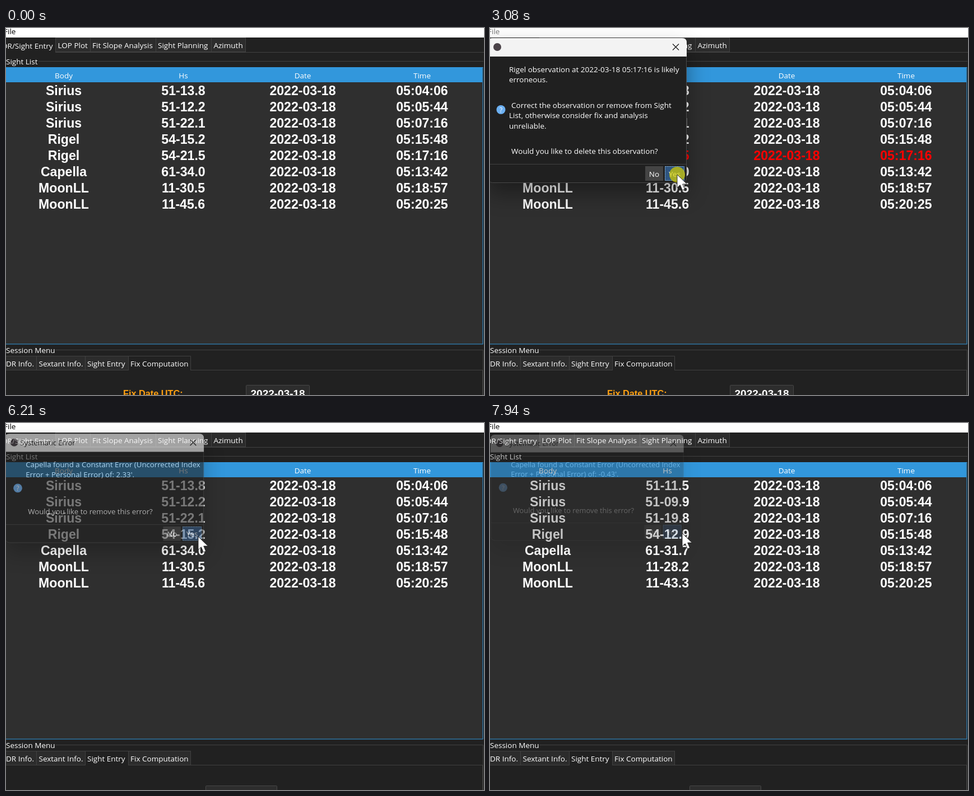
These frames come from a looping animation (853x656 px, 8000 ms). An HTML page:

```html
<!DOCTYPE html>
<html lang="en">
<head>
<meta charset="utf-8">
<title>Sight list corrections</title>
<style>
  html, body { margin: 0; width: 100%; height: 100%; overflow: hidden; background: #212121; }
  svg { display: block; }
  text { font: 13.5px "Open Sans", "Noto Sans", sans-serif; fill: #fff; white-space: pre; }
  .mid { text-anchor: middle; }
  .cell { font: bold 23.1px "Liberation Sans", Arial, sans-serif; text-anchor: middle; }
  .red { fill: #f00; }
  .label { font: bold 16.3px "Liberation Sans", Arial, sans-serif; fill: #ffa011; }
  .entry { font: bold 19px "Liberation Sans", Arial, sans-serif; }
  .title { font-size: 13.1px; fill: #1a1a1a; }
  .shadow { filter: drop-shadow(0 18px 19px rgba(0, 0, 0, .38)); }
</style>
</head>
<body>
<svg id="stage" width="853" height="656"></svg>
<script>
const LINE = '#414141', BLUE = '#3297dc', TAB = '#2c2c2c';
const LOOP = 8000, DELETED = 3360, CORRECTED = 6320;

const text = (x, y, s, cls = '', extra = '') =>
  `<text x="${x}" y="${y}" class="${cls}" ${extra}>${s}</text>`;
const rect = (x, y, w, h, fill, extra = '') =>
  `<rect x="${x}" y="${y}" width="${w}" height="${h}" fill="${fill}" ${extra}/>`;
const path = (d, stroke = LINE, extra = '') =>
  `<path d="${d}" fill="none" stroke="${stroke}" ${extra}/>`;
const group = (id, body) => `<g id="${id}">${body}</g>`;

// Body, degrees, minutes, time
const sights = [
  ['Sirius', 51, 13.8, '05:04:06'],
  ['Sirius', 51, 12.2, '05:05:44'],
  ['Sirius', 51, 22.1, '05:07:16'],
  ['Rigel', 54, 15.2, '05:15:48'],
  ['Rigel', 54, 21.5, '05:17:16'],
  ['Capella', 61, 34.0, '05:13:42'],
  ['MoonLL', 11, 30.5, '05:18:57'],
  ['MoonLL', 11, 45.6, '05:20:25']
];
const BAD = 4;
const kept = sights.filter((_, i) => i !== BAD);
const columns = [103, 316.5, 529.5, 742.5];

function table(list, shift = 0) {
  return list.map(([body, deg, min, time], row) => {
    const hs = `${deg}-${(min - shift).toFixed(1).padStart(4, '0')}`;
    const cells = [body, hs, '2022-03-18', time]
      .map((s, i) => text(columns[i], 120 + 29 * row, s, 'cell')).join('');
    return `<g>${cells}</g>`;
  }).join('');
}

// Tab strip: edges holds the borders, starts the text positions
function tabs(names, edges, starts, top, active) {
  const base = top + 26;
  return names.map((name, i) => {
    const x = edges[i], w = edges[i + 1] - x;
    const box = i === active
      ? path(`M${x + .5} ${base}V${top + .5}H${x + w + .5}V${base}`) +
        rect(x + 1, base - 1, w - 1, 2, '#212121')
      : rect(x + .5, top + .5, w, 25, TAB, `stroke="${LINE}"`);
    return box + text(starts[i], top + 18.5, name);
  }).join('');
}

const sessionTabs = active => path('M0 611.5H850.5V656') +
  tabs(['DR Info.', 'Sextant Info.', 'Sight Entry', 'Fix Computation'],
    [-10, 54, 141, 218, 329], [0, 58.5, 145, 222], 586, active);

const field = (x, y, w) => rect(x + .5, y + .5, w, 30, '#2d2d2d', 'stroke="#474747" rx="1"');

const dialogs = [
  { right: 351, bottom: 277, icon: 146, cy: 100, title: '',
    lines: [[34, 78.5, 'Rigel observation at 2022-03-18 05:17:16 is likely'], [34, 97, 'erroneous.'],
      [38, 142.5, 'Correct the observation or remove from Sight'],
      [34, 161, 'List, otherwise consider fix and analysis'], [34, 179.5, 'unreliable.'],
      [38, 225, 'Would you like to delete this observation?']],
    open: [500, 320, 3], close: [[3280, .98, .6], [DELETED, .9, 0]] },
  errorDialog('2.33', [3560, 90, 1],
    [[6120, .99, .85], [6210, .981, .6], [6260, .965, .3], [CORRECTED, .9, 0]]),
  errorDialog('-0.43', [6850, 540, 7],
    [[7800, .99, .85], [7880, .975, .5], [7940, .952, .26]])
];

function errorDialog(value, open, close) {
  return { right: 358, bottom: 217, icon: 117, cy: 82, title: 'Systematic Error',
    lines: [[34, 78.5, 'Capella found a Constant Error (Uncorrected Index'],
      [34, 97, `Error + Personal Error) of: ${value}'.`],
      [38, 165, 'Would you like to remove this error?']],
    open, close };
}

function dialog({ right: r, bottom: b, icon, title, lines }, i) {
  const x = r - 19.5;
  return group('dialog' + i,
    rect(-4, 18, r + 4, b - 18, '#202020', 'rx="8" class="shadow"') +
    rect(-3.5, 18.5, r + 3, b - 19, 'none', 'rx="8" stroke="#484848"') +
    `<path d="M-4 51V26q0-8 8-8H${r - 8}q8 0 8 8V51z" fill="#f3f3f3"/>` +
    '<circle cx="13" cy="34" r="7" fill="#4a4248"/>' +
    text(24, 39, title, 'title') +
    path(`M${x - 5.5} 28.5l11 11m0-11l-11 11`, '#1a1a1a', 'stroke-width="1.3"') +
    `<circle cx="19.5" cy="${icon}" r="8" fill="#6cb0f2"/>` +
    text(19.5, icon + 4.5, '?', 'mid', 'style="font-size:12px"') +
    lines.map(line => text(...line)).join('') +
    path(`M-3 ${b - 33.5}H${r - 1}`) +
    rect(r - 74, b - 30, 32, 26, '#444') +
    rect(r - 38.5, b - 29.5, 34, 25, '#2f5580', 'stroke="#8fc1ee" stroke-dasharray="2 1"') +
    text(r - 58, b - 11.5, 'No', 'mid') + text(r - 21.5, b - 11.5, 'Yes', 'mid'));
}

const stage = document.getElementById('stage');
stage.innerHTML =
  rect(0, 0, 853, 656, '#212121') + rect(0, 0, 853, 17, '#fff') +
  text(-4, 11, 'File', '', 'id="file"') +
  path('M88 43.5H853') +
  tabs(['LOP Plot', 'Fit Slope Analysis', 'Sight Planning', 'Azimuth'],
    [88, 150, 267, 366, 427], [92.5, 154, 271, 370.5], 17, -1) +
  text(83.5, 36.5, 'DR/Sight Entry', '', 'text-anchor="end"') +
  text(0, 65, 'Sight List') + path('M58 59.5H852') +
  rect(-2, 70.5, 853, 494.5, '#2f2f2f', `stroke="${BLUE}"`) + rect(0, 70, 850, 27, BLUE) +
  ['Body', 'Hs', 'Date', 'Time'].map((s, i) => text(columns[i], 90, s, 'mid')).join('') +
  group('all', table(sights)) +
  group('kept', table(kept)) +
  group('corrected', table(kept, 2.3)) +
  text(0, 581, 'Session Menu') + path('M88 575.5H851.5V656') +
  group('fixTab', sessionTabs(3) + text(209, 658.5, 'Fix Date UTC:', 'label') +
    field(428, 638, 113) + text(436.5, 660, '2022-03-18', 'entry')) +
  group('entryTab', sessionTabs(2) + group('button', field(356, 648, 127))) +
  dialogs.map(dialog).join('') +
  '<circle id="click" r="14" fill="#d7d000" fill-opacity=".7"/>' +
  '<path id="cursor" d="M0 0V23.5L5.3 18.6 9.3 28 13.6 26.2 9.7 17H17.5z" fill="#fff" stroke="#111" stroke-width=".8"/>';

const el = id => document.getElementById(id);
const show = (id, on) => { el(id).style.display = on ? '' : 'none'; };

// Time, x, y of the pointer tip
const track = [
  [2050, 434, 538], [2250, 395, 420], [2500, 335, 285], [2640, 321, 258], [2810, 334, 262],
  [4930, 334, 262], [5200, 327, 228], [5480, 338, 197], [5690, 343, 205], [5830, 343, 203],
  [7080, 343, 203], [7380, 343, 197], [LOOP, 343, 197]
];
const clicks = [[3080, 3280], [5980, 6120], [7660, 7800]];

function pointer(t) {
  const i = Math.max(1, track.findIndex(k => k[0] > t));
  const [t0, x0, y0] = track[i - 1], [t1, x1, y1] = track[i];
  const p = Math.max(0, (t - t0) / (t1 - t0));
  return [x0 + (x1 - x0) * p, y0 + (y1 - y0) * p];
}

// Scale and opacity of a dialog; both change in steps
function pose({ open: [start, span, steps], close }, t) {
  if (t < start) return [1, 0];
  const closing = close.filter(k => k[0] <= t).pop();
  if (closing) return closing.slice(1);
  const p = Math.min(1, Math.floor((t - start) / span * steps + 1e-6) / steps);
  return [1 - .09 * (1 - p) ** 2, Math.min(1, .35 + 2.3 * p)];
}

function render(t) {
  show('all', t < DELETED);
  show('kept', t >= DELETED && t < CORRECTED);
  show('corrected', t >= CORRECTED);
  el('all').children[BAD].querySelectorAll('text')
    .forEach(c => c.classList.toggle('red', t >= 500));
  show('fixTab', t < DELETED);
  show('entryTab', t >= DELETED);
  show('button', t >= 3560);

  dialogs.forEach((d, i) => {
    const [scale, opacity] = pose(d, t), node = el('dialog' + i);
    show(node.id, opacity > 0);
    node.setAttribute('opacity', opacity);
    node.setAttribute('transform',
      `translate(100 ${d.cy}) scale(${scale}) translate(-100 ${-d.cy})`);
  });
  const modal = dialogs.some(d => t >= d.open[0] && t < d.close[0][0]);
  el('file').style.fill = modal ? '#777' : '#000';

  const at = `translate(${pointer(t).join(' ')})`;
  show('cursor', t >= track[0][0]);
  show('click', clicks.some(([a, b]) => t >= a && t < b));
  el('cursor').setAttribute('transform', at);
  el('click').setAttribute('transform', at);
}

const begin = performance.now();
function tick() {
  render((performance.now() - begin) % LOOP);
  requestAnimationFrame(tick);
}
tick();
</script>
</body>
</html>
```
